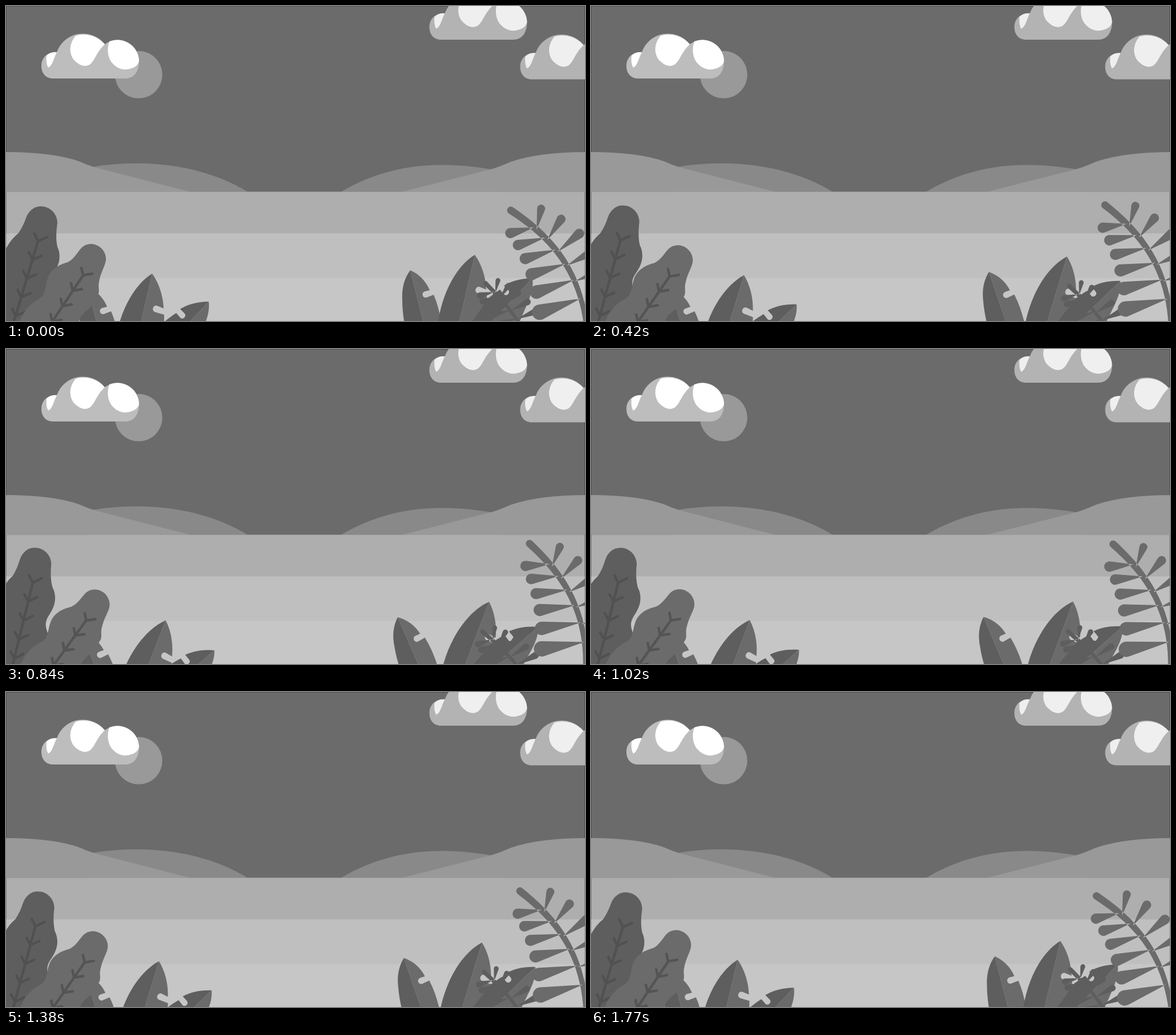
An HTML page for the animation above (1.8 s loop, 1014 by 552 pixels).

```html
<!DOCTYPE html>
<html lang="en">
<head>
<meta charset="utf-8">
<title>Swaying plants</title>
<style>
  html, body { margin: 0; width: 100%; height: 100%; overflow: hidden; background: #6b6b6b; }
  svg { display: block; width: 100%; height: 100%; }
  .dark { fill: #5e5e5e; }
  .mid { fill: #6b6b6b; }
  .vein { fill: none; stroke-width: 4.5; stroke-linecap: round; stroke-linejoin: round; }
</style>
</head>
<body>
<svg viewBox="0 0 1014 552">
  <defs>
    <g id="cloud">
      <path d="M82 127C70 127 62 118 62 105C62 90 73 80 89 81A48.5 48.5 0 0 1 173 67A38 38 0 0 1 233 96C233 115 224 127 209 127Z"/>
      <g fill="var(--shine)">
        <path d="M89 81C82 80 76 82 71 87C70 96 71 103 74 108C82 104 83 92 89 81Z"/>
        <path d="M122 52C111 65 110 80 117 92C124 101 132 105 139 105C155 104 154 85 173 67A48.5 48.5 0 0 0 122 52Z"/>
        <path d="M181 62C176 75 178 93 188 102C197 111 208 113 217 110C227 108 232 102 233 96A38 38 0 0 0 181 62Z"/>
      </g>
    </g>
    <g id="narrowLeaf">
      <path class="dark" d="M708 463C697 478 693 495 694 515C694 535 697 550 702 590H740Z"/>
      <path class="mid" d="M708 463C724 470 736 483 742 498L734 500A5.5 5.5 0 0 0 736 511L749 506C755 520 759 535 762 552L764 590H740Z"/>
    </g>
    <g id="broadLeaf">
      <path class="dark" d="M821 436C790 455 765 500 757 552L750 610H781Z"/>
      <path class="mid" d="M821 436C833 453 840 474 841 497L829 492A6 6 0 0 0 825 503L842 508C842 530 838 565 832 610H781Z"/>
    </g>
    <g id="lowLeaf">
      <path class="dark" d="M355 518C336 518 318 523 305 531L313 539A5.5 5.5 0 0 1 306 547L298 538C290 543 284 548 279 552L245 600H278Z"/>
      <path class="mid" d="M355 518C357 532 353 545 348 558L330 600H278Z"/>
    </g>
  </defs>

  <rect width="1014" height="552" fill="#6b6b6b"/>
  <rect x=".5" y=".5" width="1013" height="551" fill="none" stroke="#505050"/>
  <circle cx="232.3" cy="120.3" r="41.5" fill="#999"/>
  <use href="#cloud" fill="#bdbdbd" style="--shine:#fff"/>
  <g fill="#b3b3b3" style="--shine:#efefef">
    <use href="#cloud" x="679.5" y="-68"/>
    <use href="#cloud" x="838.5" y="1.5"/>
  </g>

  <path fill="#898989" d="M140 284C225 268 335 272 423 325.5H140ZM587 325.5C675 274 765 270 865 289V325.5Z"/>
  <path fill="#999" d="M0 256C50 256 98 261 130 273C148 281 160 284 180 289L322 325.5H0ZM1014 256C964 256 920 261 884 273C866 281 855 285 838 289L694 325.5H1014Z"/>
  <g transform="translate(.5 0)">
    <rect y="325.5" width="1013" height="227" fill="#aeaeae"/>
    <rect y="398.5" width="1013" height="154" fill="#bfbfbf"/>
    <rect y="476.5" width="1013" height="76" fill="#c6c6c6"/>
  </g>

  <!-- data-sway: full angle in degrees, pivot x, pivot y -->
  <g data-sway="-3.1 0 590">
    <path class="dark" d="M-40 470C-20 460 -8 440 0 425C6 414 14 404 21 399C32 384 34 372 38 365C44 356 51 351 61 351C78 351 90 365 90 380C88 395 87 408 90 422C95 432 95 445 90 456C84 470 74 475 75 490C76 500 82 510 80 530L40 620H-40Z"/>
    <path id="tallVeins" class="vein" stroke="#515151"/>
  </g>
  <g data-sway="-5.5 182 592"><use href="#narrowLeaf" x="-565" y="29"/></g>
  <g data-sway="2.5 45 605">
    <path class="mid" d="M20 565C28 535 43 521 58 513C71 505 68 492 73 477C79 460 94 453 108 449C120 443 126 430 132 424C138 418 144 417 150 417C165 418 176 431 175 445C174 455 166 466 163 483C161 492 164 497 162 504C157 514 152 523 147 529C135 538 130 545 128 552L120 620H10Z"/>
    <path id="shortVeins" class="vein" stroke="#545454"/>
  </g>
  <g data-sway="6.1 260 623"><use href="#lowLeaf"/></g>
  <g data-sway="8.8 222 637"><use href="#broadLeaf" x="-565" y="33"/></g>

  <g data-sway="-10 740 601"><use href="#narrowLeaf"/></g>
  <g data-sway="8.4 782 622"><use href="#broadLeaf"/></g>
  <g data-sway="6.1 827 582"><use href="#lowLeaf" x="567" y="-41"/></g>
  <g data-sway="-5 953 555"><path id="smallFern" class="dark"/></g>
  <g data-sway="10 1005 551"><path id="bigFern" class="mid"/></g>
</svg>
<script>
const LOOP = 1800, STEP = 30;
const setPath = (id, d) => document.getElementById(id).setAttribute('d', d);
const repeat = (n, make) => Array.from({ length: n }, (_, i) => make(i));

// A chain of V-shaped barbs along a straight midrib.
function veins([x, y], [dx, dy], count, left, right) {
  const barbs = repeat(count, i => {
    const px = x + i * dx, py = y + i * dy;
    return `M${px + left[0]} ${py + left[1]}L${px} ${py}L${px + right[0]} ${py + right[1]}`;
  });
  return `M${x} ${y}l${dx * count} ${dy * count}` + barbs.join('');
}

// A drop: round end of radius r at (x, y), narrowing to the point (px, py).
function leaflet(x, y, r, px, py) {
  const toPoint = Math.atan2(py - y, px - x);
  const spread = Math.acos(r / Math.hypot(px - x, py - y));
  const rim = a => `${x + r * Math.cos(a)} ${y + r * Math.sin(a)}`;
  return `M${px} ${py}L${rim(toPoint + spread)}A${r} ${r} 0 1 1 ${rim(toPoint - spread)}Z`;
}

// A tapering curved stem with drops on both sides that grow towards the base.
function fern(scale, ...ctrl) {
  const at = t => [0, 1].map(k => {
    const [a, b, c, d] = ctrl.map(p => p[k]), s = 1 - t;
    return s * s * s * a + 3 * s * s * t * b + 3 * s * t * t * c + t * t * t * d;
  });
  const edge = (t, side) => {
    const [x, y] = at(t), [x2, y2] = at(t + 0.01);
    const half = side * scale * (6.5 - 2.5 * t) / Math.hypot(x2 - x, y2 - y);
    return `${x - (y2 - y) * half} ${y + (x2 - x) * half}`;
  };
  const steps = repeat(25, i => i / 24);
  const tip = 6.5 * scale;
  const stem = 'M' + steps.map(t => edge(t, -1)).reverse().join('L') +
    `A${tip} ${tip} 0 0 0 ` + steps.map(t => edge(t, 1)).join('L') + 'Z';
  const drop = (t, dx, dy, r) => {
    const [x, y] = at(t);
    return leaflet(x + dx * scale, y + dy * scale, r * scale, x, y);
  };
  const leftSide = repeat(6, i => drop(0.25 + 0.12 * i, -41 - 6.2 * i, 10 + 2.8 * i, 9 + 0.18 * i * i));
  const rightSide = repeat(5, i => {
    const angle = (-78 + 24 * i - 2.5 * i * i) * Math.PI / 180, length = 38 + 6 * i;
    return drop(0.28 + 0.115 * i, length * Math.cos(angle), length * Math.sin(angle), 7 + 0.8 * i);
  });
  return stem + leftSide.join('') + rightSide.join('');
}

setPath('tallVeins', veins([56, 412], [-9.8, 32.8], 5, [-6, -13], [16, -7]));
setPath('shortVeins', veins([135, 472], [-18, 27], 4, [-3, -13], [16, -3]));
setPath('bigFern', fern(1, [884, 358], [935, 392], [1003, 446], [1016, 560]));
setPath('smallFern', fern(0.6, [840, 486], [857, 504], [885, 528], [920, 590]));

const swaying = [...document.querySelectorAll('[data-sway]')].map(el => {
  const [angle, x, y] = el.dataset.sway.split(' ').map(Number);
  return { el, angle, x, y };
});

function draw(now) {
  const t = Math.floor(now / STEP) * STEP % LOOP;
  const lean = 1 - Math.abs(2 * t / LOOP - 1);
  for (const { el, angle, x, y } of swaying)
    el.setAttribute('transform', `rotate(${angle * lean} ${x} ${y})`);
  requestAnimationFrame(draw);
}
draw(performance.now());
</script>
</body>
</html>
```
